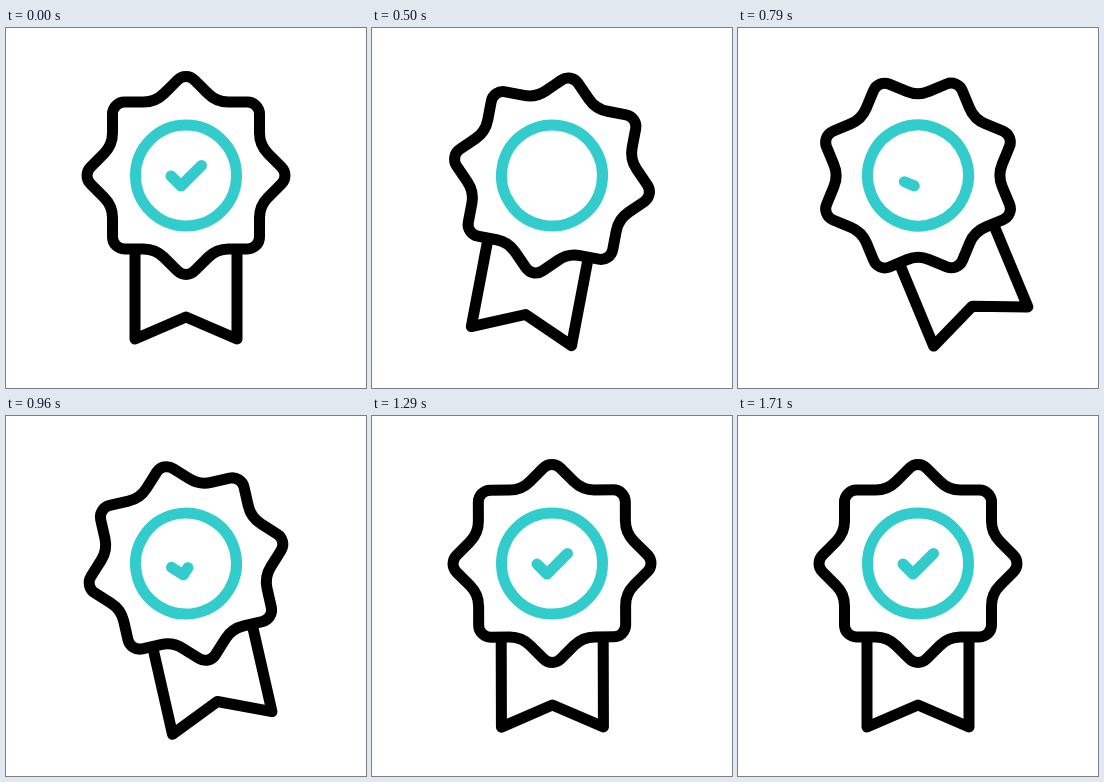
These frames come from a looping animation (360 px wide and 360 px high, 2040 ms). An HTML page with a canvas:

```html
<!DOCTYPE html>
<html lang="en">
<head>
<meta charset="utf-8">
<title>Award badge</title>
<style>
  html, body { margin: 0; width: 100%; height: 100%; overflow: hidden; background: #fff; }
  canvas { display: block; width: 360px; height: 360px; }
</style>
</head>
<body>
<canvas id="stage" width="360" height="360"></canvas>
<script>
const ctx = document.getElementById('stage').getContext('2d');
const LOOP = 2040;
const TICK = 1000 / 24;
const CENTER = { x: 180, y: 147.5 };
const BLACK = '#000';
const TEAL = '#33cccc';

// [tick, degrees]
const SWING = [[2, 0], [12.3, 10.8], [20, -24], [27, 4.8], [34, -3.3], [41, 0]];
const ERASE = [2, 8.3];
const DRAW = [15.4, 29.9];

const CHECK = [[-15, 0.5], [-5, 10.5], [15.5, -10]];
const CHECK_LENGTH = CHECK.slice(1).reduce(
  (sum, [x, y], i) => sum + Math.hypot(x - CHECK[i][0], y - CHECK[i][1]), 0);
const RIBBON = [[-51, 77], [-51, 163.5], [0, 141.5], [51, 163.5], [51, 77]];

const clamp = v => Math.min(1, Math.max(0, v));
const progress = (tick, [from, to]) => clamp((tick - from) / (to - from));
const ease = p => (1 - Math.cos(Math.PI * p)) / 2;

function swingAngle(tick) {
  let angle = 0;
  for (let i = 1; i < SWING.length; i++) {
    const [from, a] = SWING[i - 1];
    const [to, b] = SWING[i];
    angle += (b - a) * ease(progress(tick, [from, to]));
  }
  return angle * Math.PI / 180;
}

function checkAmount(tick) {
  return tick < DRAW[0] ? 1 - progress(tick, ERASE) : progress(tick, DRAW);
}

function polyline(points) {
  const path = new Path2D();
  points.forEach(([x, y]) => path.lineTo(x, y));
  return path;
}

// Two crossed squares with rounded tips and valleys.
function starPath() {
  const half = 73.5;
  const tip = half * Math.SQRT2;
  const valley = half / Math.cos(Math.PI / 8);
  const vertex = i => {
    const r = i % 2 ? valley : tip;
    const a = i * Math.PI / 8;
    return [r * Math.sin(a), -r * Math.cos(a)];
  };
  const path = new Path2D();
  const [x0, y0] = vertex(0);
  const [x1, y1] = vertex(15);
  path.moveTo((x0 + x1) / 2, (y0 + y1) / 2);
  for (let i = 0; i < 16; i++) {
    path.arcTo(...vertex(i), ...vertex(i + 1), i % 2 ? 29 : 12);
  }
  path.closePath();
  return path;
}

const star = starPath();
const ribbon = polyline(RIBBON);
const check = polyline(CHECK);
const ring = new Path2D();
ring.arc(0, 0, 50.5, 0, 2 * Math.PI);

function stroke(path, color) {
  ctx.strokeStyle = color;
  ctx.stroke(path);
}

function render(time) {
  const tick = Math.floor((time % LOOP + 4.9) / TICK);
  ctx.fillStyle = '#fff';
  ctx.fillRect(0, 0, 360, 360);
  ctx.save();
  ctx.translate(CENTER.x, CENTER.y);
  ctx.rotate(swingAngle(tick));
  ctx.lineWidth = 11;
  ctx.lineCap = ctx.lineJoin = 'round';
  stroke(ribbon, BLACK);
  ctx.fill(star);
  stroke(star, BLACK);
  stroke(ring, TEAL);
  const amount = checkAmount(tick);
  if (amount > 0) {
    ctx.setLineDash([amount * CHECK_LENGTH + 0.01, 100]);
    stroke(check, TEAL);
  }
  ctx.restore();
}

const start = performance.now();
function loop() {
  render(performance.now() - start);
  requestAnimationFrame(loop);
}
loop();
</script>
</body>
</html>
```
